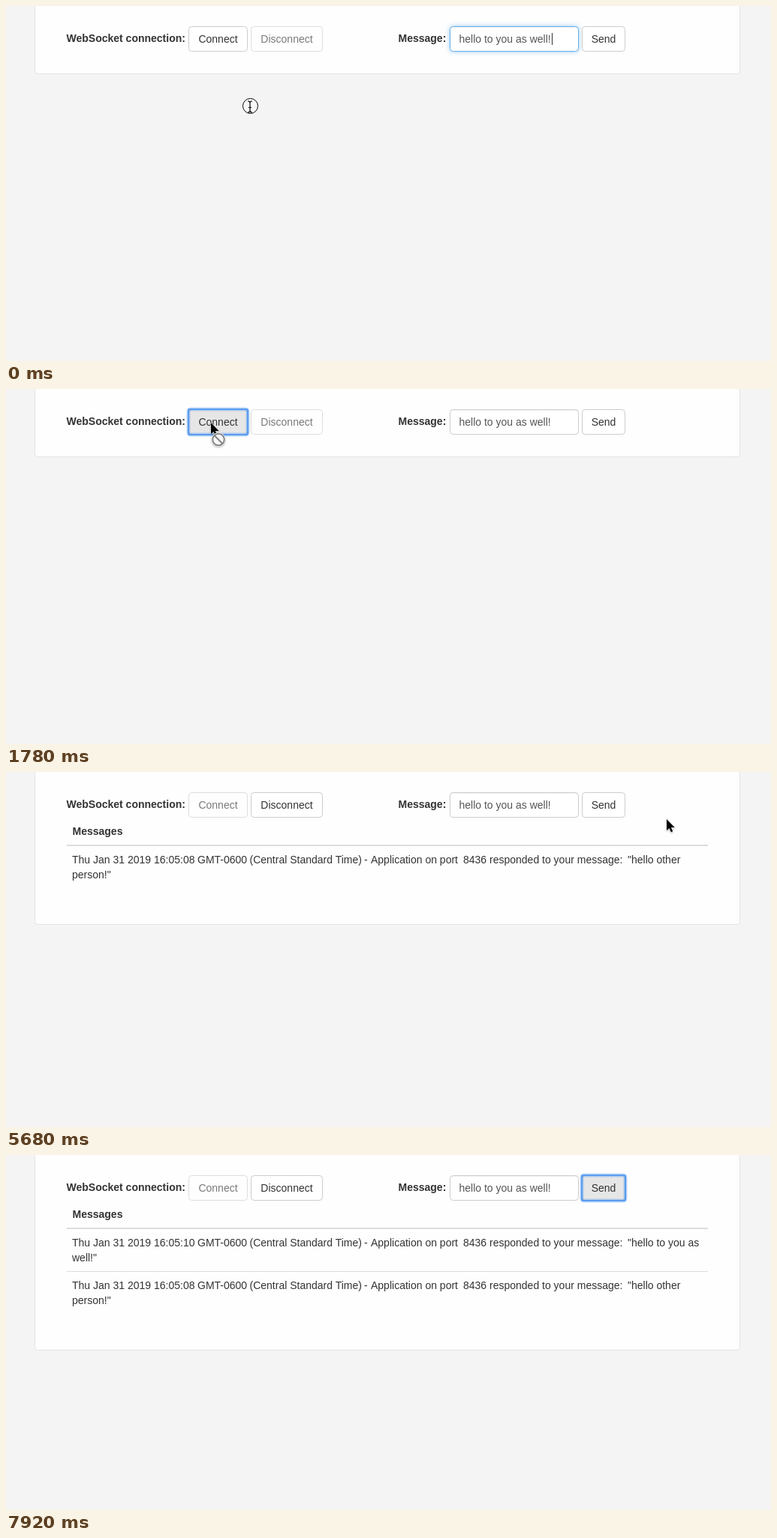
These frames come from a looping animation (1019 by 474 pixels, 8000 ms). An HTML page:

```html
<!DOCTYPE html>
<html lang="en">
<head>
<meta charset="utf-8">
<title>WebSocket messages</title>
<style>
html, body { margin: 0; width: 100%; height: 100%; overflow: hidden; background: #f4f4f4; }
svg { display: block; width: 100vw; height: 100vh; }
text { font: 14px "Liberation Sans", Arial, sans-serif; fill: #333; white-space: pre; }
.bold { font-weight: bold; }
.mid { text-anchor: middle; }
.glow { filter: drop-shadow(0 0 3px rgba(102, 175, 233, .65)); }
.cursor { filter: drop-shadow(0 1px 1px rgba(0, 0, 0, .3)); }
</style>
</head>
<body>
<svg id="stage" viewBox="0 0 1019 474"></svg>
<script>
const LOOP = 8000;
const stage = document.getElementById('stage');

// Pointer samples: start time, shape, hotspot x, y
const pointer = [
  [0, 'beam', 325.5, 133.5],
  [150, 'none', 0, 0],
  [450, 'arrow', 306, 135],
  [600, 'arrow', 288, 108],
  [750, 'arrow', 276, 80],
  [900, 'arrow', 271, 62],
  [1040, 'hand', 272, 52],
  [1190, 'hand', 273, 45],
  [1780, 'denied', 273, 45],
  [2230, 'arrow', 430, 72],
  [2380, 'arrow', 700, 104],
  [2530, 'arrow', 901, 124],
  [2680, 'none', 0, 0],
  [5080, 'arrow', 940, 104],
  [5230, 'arrow', 906, 79],
  [5380, 'arrow', 890, 66],
  [5680, 'arrow', 880, 63],
  [5830, 'arrow', 860, 58],
  [5980, 'arrow', 840, 53],
  [6120, 'hand', 822, 49],
  [6270, 'hand', 812, 46],
  [6420, 'hand', 807, 45],
  [7620, 'hand', 816, 45],
  [7770, 'arrow', 841, 44],
  [7920, 'none', 0, 0]
];

const within = (t, from, to = LOOP) => t >= from && t < to;

const rect = (x, y, w, h, attrs) =>
  `<rect x="${x}" y="${y}" width="${w}" height="${h}" ${attrs}/>`;

const text = (x, y, str, attrs = '') => `<text x="${x}" y="${y}" ${attrs}>${str}</text>`;

function button(x, w, label, { disabled, hover, pressed, ring }) {
  const active = hover || pressed || ring;
  const fill = pressed ? '#d9d9d9' : active ? '#e6e6e6' : '#fff';
  const stroke = active ? '#adadad' : '#ccc';
  let out = rect(x + .5, 27.5, w - 1, 33, `rx="4" fill="${fill}" stroke="${stroke}"`);
  if (ring) {
    out += rect(x, 27, w, 34, 'rx="3" fill="none" stroke="#5b9df0" stroke-opacity=".4" stroke-width="5"') +
      rect(x, 27, w, 34, 'rx="2" fill="none" stroke="#5b9df0" stroke-width="2.2"');
  }
  out += text(x + w / 2, 49, label, 'class="mid"');
  return `<g opacity="${disabled ? .65 : 1}">${out}</g>`;
}

function input(focused, caret) {
  const look = focused ? 'stroke="#66afe9" class="glow"' : 'stroke="#ccc"';
  return rect(591.5, 27.5, 171, 33, `rx="4" fill="#fff" ${look}`) +
    rect(593, 28, 168, 1, 'fill="#000" opacity=".05"') +
    text(603.5, 49, 'hello to you as well!', 'style="fill:#555"') +
    (caret ? rect(727, 36, 1, 16, 'fill="#333"') : '');
}

function row(y, seconds, first, second) {
  const line = [
    [88, `Thu Jan 31 2019 16:05:${seconds}`],
    [255, 'GMT-0600'],
    [324.5, '(Central Standard Time)'],
    [477, '-'],
    [486, 'Application on port'],
    [609, '8436'],
    [644, 'responded to your message:'],
    [828, `"${first}`]
  ];
  return text(0, y, line.map(([x, s]) => `<tspan x="${x}">${s} </tspan>`).join('')) +
    text(88, y + 20, `${second}"`);
}

const arrow = '<path d="M0 0V15L3.5 11.9 5.8 17.3 8.2 16.3 5.9 11H10.7Z" fill="#000" stroke="#fff" stroke-width="1" paint-order="stroke"/>';

const shapes = {
  none: '',
  arrow,
  denied: arrow +
    '<g transform="translate(10 22.5)" fill="none"><circle r="8" fill="#f6f6f6" stroke="#fff" stroke-width="3"/>' +
    '<circle r="7.8" stroke="#858585" stroke-width="2"/><path d="M-5.2-5.2 5.2 5.2" stroke="#858585" stroke-width="2"/></g>',
  hand: '<path transform="translate(-5 -1)" d="M3.4 10.6V2.4Q3.6 .8 4.9 .8T6.4 2.4V7.2Q7.8 6 9 7.6 10.6 6.6 11.6 8.2 13.6 7.6 13.8 9.6V12.5Q13.6 14.5 12.4 16V17.6H5.4V16.2Q3.6 14.2 2.6 12.4L.8 9.6Q.6 8 2.2 8.4Z" fill="#fff" stroke="#000" stroke-linejoin="round"/>' +
    '<path d="M1.8 10.6V14M4 10.6V14M6.2 10.6V14" stroke="#000" stroke-width=".9"/>',
  beam: '<circle r="10" fill="#f8f8f8" stroke="#000"/>' +
    '<path d="M-3.5-6.5Q-.5-6.5-.5-4.5 -.5-6.5 2.5-6.5M-.5-5V7M-3.5 8.5Q-.5 8.5-.5 6.5 -.5 8.5 2.5 8.5M-2.5 2H1.5" fill="none" stroke="#000" stroke-width="1.2"/>'
};

function cursor(t) {
  const [, kind, x, y] = pointer.filter(p => p[0] <= t).pop();
  const cls = kind === 'beam' ? '' : 'class="cursor"';
  return `<g ${cls} transform="translate(${x} ${y})">${shapes[kind]}</g>`;
}

function scene(t) {
  const connected = t >= 1930;
  const rows = (t >= 4480) + (t >= 6870);
  const bottom = !connected ? 90.5 : [147.5, 203.5, 260.5][rows];

  let out = rect(0, 0, 1019, 474, 'fill="#f4f4f4"') +
    rect(38.5, -2.5, 939, bottom + 2.5, 'rx="4" fill="#fefefe" stroke="#e3e3e3"') +
    text(80.5, 48, 'WebSocket connection:', 'class="bold"') +
    button(243, 79, 'Connect', {
      disabled: connected,
      hover: within(t, 1040, 1930),
      pressed: within(t, 1480, 1630),
      ring: within(t, 1480, 1930)
    }) +
    button(326, 96, 'Disconnect', { disabled: !connected }) +
    text(522.5, 48, 'Message:', 'class="bold"') +
    input(t < 1480, t < 150 || within(t, 600, 1190)) +
    button(767, 58, 'Send', {
      hover: t >= 6120,
      pressed: within(t, 6570, 6720),
      ring: t >= 6570
    });

  if (connected) {
    out += text(88.5, 84, 'Messages', 'class="bold"') + rect(81, 97, 854, 2, 'fill="#ddd"');
  }
  if (rows === 1) out += row(122, '08', 'hello other', 'person!');
  if (rows === 2) {
    out += row(122, '10', 'hello to you as', 'well!') +
      rect(81, 155, 854, 1, 'fill="#ddd"') +
      row(179, '08', 'hello other', 'person!');
  }
  if (within(t, 4480, 5080)) out += rect(1007, 0, 12, 474, 'fill="#ebebeb"');
  return out + cursor(t);
}

let shown = '';
const start = performance.now();

function tick() {
  const markup = scene((performance.now() - start) % LOOP);
  if (markup !== shown) stage.innerHTML = shown = markup;
  requestAnimationFrame(tick);
}
tick();
</script>
</body>
</html>
```
